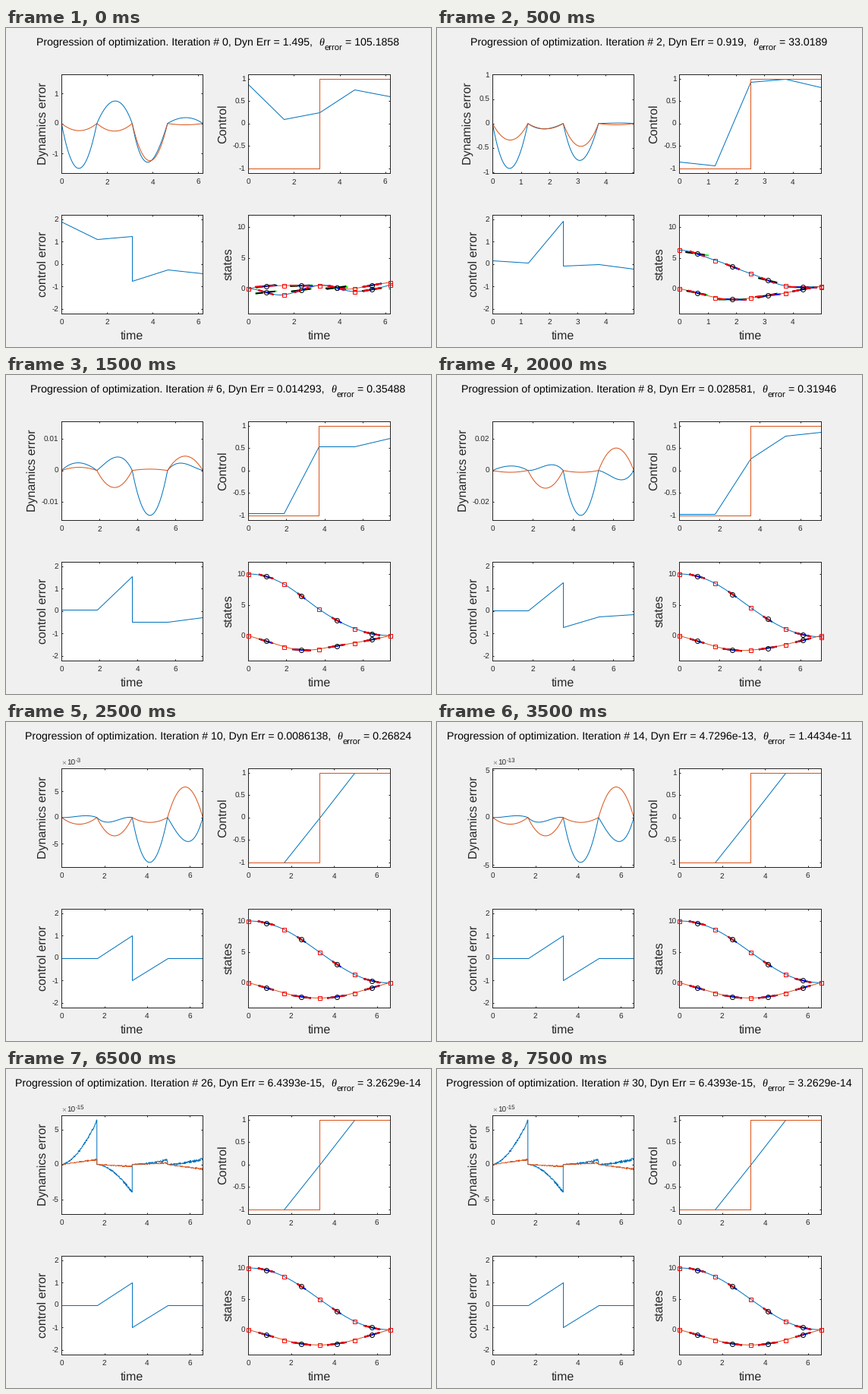
Animation of 560 by 420 pixels, one loop 8000 ms. Source, as a matplotlib script:

```python
import matplotlib.pyplot as plt
import numpy as np
from matplotlib.animation import FuncAnimation
from matplotlib.textpath import TextPath

W, H, DPI = 560, 420, 100
SANS, SERIF = "Liberation Sans", "Liberation Serif"
BLUE, ORANGE, DARK = "#0072BD", "#D95319", "#262626"
FRAMES = 16
TITLE_PX, LABEL_PX, TICK_PX = 14.15, 16, 10
LEFT, RIGHT, UPPER, LOWER = 73.2, 319.4, 60.7, 245.7
BOX_W, BOX_H = 186.2, 130

plt.rcParams.update({"font.family": SANS, "text.hinting": "none"})
fig = plt.figure(figsize=(W / DPI, H / DPI), dpi=DPI, facecolor="#F0F0F0")

# Largest dynamics error and theta error, per step until convergence
DYN = [1.495, .919, .2137, .014293, .028581, .0086138,
       2.6417e-6, 4.7296e-13, 6.4393e-15]
THETA = [105.1858, 33.0189, 4.3718, .35488, .31946, .26824,
         7.205e-5, 1.4434e-11, 3.2629e-14]

# Key iterates; the steps between them are blended
KEYS = [0, 1, 3, 5]
START = 10
DURATION = [6.2, 4.99, 7.435, 4 * np.sqrt(START * 3 / 11)]
ORIGIN = [0, 6.25, START, START]
CONTROL = [[.875, .1, .25, .76, .6], [-.85, -.94, .92, 1, .8],
           [-.95, -.95, .53, .53, .72], np.clip(np.arange(-2, 3), -1, 1)]
# Mid-segment errors of position and speed, relative to the largest
POS_ERR = [[-1, .5, -.85, .13], [-1, -.12, -.82, .01],
           [.17, .29, -1, .15], [.03, -.08, -1, -.52]]
VEL_ERR = [[-.16, -.17, -.83, -.03], [-.37, -.12, -.51, -.03],
           [.07, -.38, .03, .32], [-.15, -.41, -.11, .68]]


def blend(keys, i):
    return np.array([np.interp(i, KEYS, col) for col in np.transpose(keys)])


class Iterate:
    def __init__(self, i):
        i = min(i, len(DYN) - 1)
        self.dyn, self.theta = DYN[i], THETA[i]
        self.converged = i == len(DYN) - 1
        self.tf = np.interp(i, KEYS, DURATION)
        self.h = self.tf / 4
        self.x0 = np.interp(i, KEYS, ORIGIN)
        self.u = blend(CONTROL, i)
        ex, ev = blend(POS_ERR, i), blend(VEL_ERR, i)
        scale = self.dyn / abs(ex).max()
        self.ex, self.ev = ex * scale, ev * scale
        self.nodes = np.linspace(0, self.tf, 5)

    def times(self, s):
        return (self.nodes[:-1, None] + s * self.h).ravel()

    def states(self):
        """Per state: nodes, node slopes, midpoints, model and spline slopes."""
        u, h, ex, ev = self.u, self.h, self.ex, self.ev
        mean = lambda y: (y[:-1] + y[1:]) / 2
        mid = lambda y, d: mean(y) - h / 8 * np.diff(d)
        grow = lambda y0, d: y0 + np.append(0, np.cumsum(d * h / 1.5))
        v = grow(0, ev + 1.5 * mean(u))
        vm = mid(v, u)
        x = grow(self.x0, ex + mean(v) / 2 + vm)
        um = mean(u)
        return (x, v, mid(x, v), vm, vm + ex), (v, u, vm, um, um + ev)

    def errors(self, s):
        if self.converged:
            return residue(s)
        ex, ev = self.ex[:, None], self.ev[:, None]
        bump = 4 * s * (1 - s)
        skew = self.h * (2 * s**2 - 4 / 3 * s**3 - 2 / 3 * s)
        return (ex * bump - ev * skew).ravel(), (ev * bump).ravel()


def residue(s, quantum=1.1e-16):
    """Floating point leftovers: drift per segment plus quantised noise."""
    rng = np.random.default_rng(4)

    def drift(ends, power, amp):
        y = np.array(ends)[:, None] * 1e-15 * s**power
        y += amp * (.2 + s) * rng.uniform(-1, 1, y.shape) * quantum
        return (np.round(y / quantum) * quantum).ravel()

    return drift([6.3, -4, .6, .8], 1.7, 1.6), drift([.7, -.3, .2, -.7], 1, .8)


def pt(px):
    return px * 72 / DPI


def advance(s, px, **prop):
    """Pen advance of a string in pixels."""
    prop = dict(family=SANS) | prop
    end = lambda t: TextPath((0, 0), t, size=px, prop=prop).get_extents().x1
    return end(s + "|") - end("|")


def label(x, y, s, px, color=DARK, **kw):
    kw = dict(ha="left", va="baseline") | kw
    fig.text(x / W, 1 - y / H, s, fontsize=pt(px), color=color, **kw)


def xlabel(x, s):
    label(x + BOX_W / 2, 410, s, LABEL_PX, ha="center")


def ylabel(x, y, s):
    label(x, y + BOX_H / 2, s, LABEL_PX, ha="center", rotation=90,
          rotation_mode="anchor")


def number(v):
    digits = max(int(np.floor(np.log10(v))), 0) + 5
    return f"{v:.{digits}g}"


def draw_title(n, it):
    head = "Progression of optimization. Iteration # "
    parts = [
        (f"{head}{n}, Dyn Err = {number(it.dyn)},  ", TITLE_PX, 23, {}),
        ("θ", TITLE_PX, 23, dict(family=SERIF, style="italic")),
        ("error", 11.3, 30, {}),
        (" ", TITLE_PX, 23, {}),
        (f"= {number(it.theta)}", TITLE_PX, 23, {}),
    ]
    widths = [advance(s, px, **prop) for s, px, _, prop in parts]
    x = 279.5 - sum(widths) / 2
    for (s, px, y, prop), w in zip(parts, widths):
        label(x, y, s, px, "black", **prop)
        x += w


def panel(x, y, tf, ylim, yticks):
    ax = fig.add_axes([x / W, 1 - (y + BOX_H) / H, BOX_W / W, BOX_H / H])
    xticks = np.arange(0, tf, 1 if tf < 5 else 2)
    ax.set(xlim=(0, tf), ylim=ylim, xticks=xticks, yticks=yticks)
    ax.tick_params(direction="in", length=pt(2), width=pt(1), color=DARK,
                   top=True, right=True, labelbottom=False, labelleft=False)
    for spine in ax.spines.values():
        spine.set(linewidth=pt(1), edgecolor=DARK)
    for t in xticks:
        label(x + BOX_W * t / tf, y + BOX_H + 14.8, f"{t:g}", TICK_PX,
              ha="center")
    for t in yticks:
        ty = y + BOX_H * (ylim[1] - t) / (ylim[1] - ylim[0])
        label(x - 4, ty + 3.5, f"{t:g}", TICK_PX, ha="right")
    return ax


def line(ax, x, y, color, width=1, **kw):
    ax.plot(x, y, color=color, lw=pt(width), **kw)


def tick_step(lim):
    unit = 10.0 ** np.floor(np.log10(lim))
    return max(k * unit for k in (.5, 1, 2, 5) if k * unit <= lim / 1.03)


def draw_errors(it):
    exp = int(np.floor(np.log10(it.dyn))) if it.dyn < .01 else 0
    scale = 10.0 ** exp
    lim = 1.1 * it.dyn / scale
    step = tick_step(lim)
    k = int(lim / step)
    ticks = np.arange(-k, k + 1) * step
    ax = panel(LEFT, UPPER, it.tf, (-lim, lim), ticks)
    s = np.linspace(0, 1, 100)
    for e, color in zip(it.errors(s), (BLUE, ORANGE)):
        line(ax, it.times(s), e / scale, color)
    widest = max((f"{t:g}" for t in ticks), key=len)
    ylabel(61.5 - advance(widest, TICK_PX), UPPER, "Dynamics error")
    if exp:
        label(LEFT, 57, "×", TICK_PX, "gray")
        label(LEFT + 7, 57, "10", TICK_PX)
        label(LEFT + 18.5, 52.5, str(exp), 8)


def draw_controls(it):
    # both sides of the switch at half time
    split = [0, 1, 2, 2, 3, 4]
    t, u = it.nodes[split], it.u[split]
    bang = np.repeat([-1, 1], 3)

    ax = panel(RIGHT, UPPER, it.tf, (-1.1, 1.1), np.arange(-1, 1.5, .5))
    line(ax, t, u, BLUE, snap=True)
    line(ax, t, bang, ORANGE, snap=True)
    ylabel(290, UPPER, "Control")

    ax = panel(LEFT, LOWER, it.tf, (-2.2, 2.2), np.arange(-2, 3))
    line(ax, t, u - bang, BLUE, snap=True)
    ylabel(53, LOWER, "control error")
    xlabel(LEFT, "time")


def hermite(y, d, h, s):
    a, b = y[:-1, None], y[1:, None]
    da, db = h * d[:-1, None], h * d[1:, None]
    return (a * (1 + 2 * s) * (1 - s) ** 2 + da * s * (1 - s) ** 2
            + b * s * s * (3 - 2 * s) + db * s * s * (s - 1)).ravel()


def tangent(ax, t, y, slope, under, over):
    d = np.array([-.5, .5]) / np.hypot(1, slope)
    line(ax, t + d, y + d * slope, under, 2, solid_capstyle="butt")
    line(ax, t + d, y + d * slope, over, 2, ls=(0, (5, 3)))


def draw_states(it):
    ax = panel(RIGHT, LOWER, it.tf, (-4, 12), [0, 5, 10])
    s = np.linspace(0, 1, 40)
    mids = it.nodes[:-1] + it.h / 2
    curves = it.states()
    for (y, d, *_), color in zip(curves, (BLUE, ORANGE)):
        line(ax, it.times(s), hermite(y, d, it.h, s), color)
    mark = dict(ls="none", mfc="none", mew=pt(1), clip_on=False, zorder=5)
    for y, _, ym, model, spline in curves:
        for t, m, a, b in zip(mids, ym, model, spline):
            tangent(ax, t, m, a, "lime", "black")
            tangent(ax, t, m, b, "blue", "red")
        ax.plot(mids, ym, "o", mec="black", ms=pt(6), **mark)
        ax.plot(it.nodes, y, "s", mec="red", ms=pt(5), **mark)
    ylabel(297, LOWER, "states")
    xlabel(RIGHT, "time")


def update(i):
    fig.clear()
    it = Iterate(i)
    draw_title(2 * i, it)
    draw_errors(it)
    draw_controls(it)
    draw_states(it)
    return []


anim = FuncAnimation(fig, update, frames=FRAMES, interval=500,
                     init_func=lambda: [], repeat=True, repeat_delay=0)
plt.show()
```
